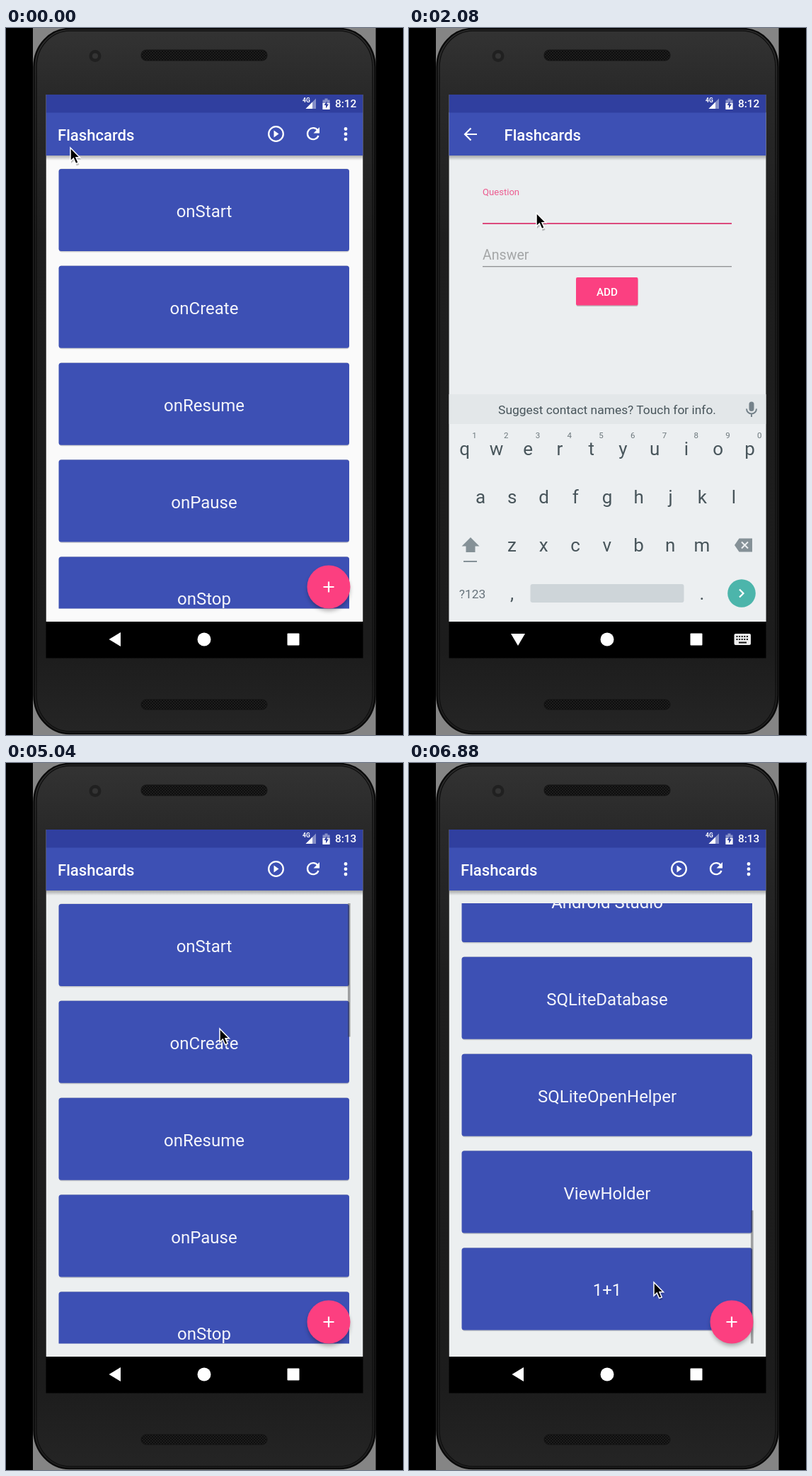
An HTML page for the animation above (6960 ms loop, 561 by 998 pixels).

```html
<!DOCTYPE html>
<html lang="en">
<head>
<meta charset="utf-8">
<title>Flashcards demo</title>
<style>
  html, body { margin: 0; width: 100%; height: 100%; overflow: hidden; background: #000; }
  svg { display: block; width: 561px; height: 998px; font-family: Roboto, "Noto Sans", sans-serif; }
  .mid { text-anchor: middle; }
  .title { font-size: 22.1px; font-weight: 500; fill: #fff; }
  .card { font-size: 24px; fill: #f4f5fb; text-anchor: middle; }
  .field { font-size: 19.6px; fill: #444647; }
  .key { font-size: 26px; fill: #48555b; text-anchor: middle; }
  .digit { font-size: 11.5px; fill: #6c777c; text-anchor: middle; }
</style>
</head>
<body>
<svg viewBox="0 0 561 998">
  <defs>
    <linearGradient id="body" x2="0" y2="1">
      <stop offset="0" stop-color="#333"/><stop offset=".09" stop-color="#292929"/>
      <stop offset=".3" stop-color="#1e1e1e"/><stop offset=".88" stop-color="#1c1c1c"/>
      <stop offset="1" stop-color="#252525"/>
    </linearGradient>
    <linearGradient id="drop" x2="0" y2="1">
      <stop offset="0" stop-opacity=".3"/><stop offset="1" stop-opacity="0"/>
    </linearGradient>
    <pattern id="mesh" width="4" height="4" patternUnits="userSpaceOnUse">
      <rect width="4" height="4" fill="#1d1d1d"/>
      <circle cx="1" cy="1" r="1" fill="#090909"/><circle cx="3" cy="3" r="1" fill="#090909"/>
    </pattern>
    <filter id="blur" x="-30%" y="-30%" width="160%" height="160%"><feGaussianBlur stdDeviation="3"/></filter>
    <clipPath id="screen"><rect x="56.500" y="94" width="448" height="744"/></clipPath>
    <clipPath id="listClip"><rect x="70" y="198" width="417" height="621.500"/></clipPath>
    <g id="bar">
      <rect x="56.500" y="180" width="448" height="7" fill="url(#drop)"/>
      <rect x="56.500" y="119" width="448" height="61" fill="#3d50b4"/>
    </g>
  </defs>

  <rect width="561" height="998"/>
  <rect x="38" width="484.500" height="998" fill="#858585"/>
  <rect x="39.500" y="1" width="482" height="995" rx="50" ry="54" fill="url(#body)" stroke="#0b0b0b" stroke-width="2.500"/>
  <rect x="43" y="4" width="475" height="989" rx="47" ry="51" fill="none" stroke="#111" stroke-width="1.500"/>
  <circle cx="126" cy="39.500" r="8.500" fill="#202020"/><circle cx="126" cy="39.500" r="4" fill="#343434"/>
  <rect x="191" y="31" width="178" height="15" rx="7" fill="url(#mesh)" stroke="#151515"/>
  <rect x="191" y="948" width="178" height="14" rx="7" fill="url(#mesh)" stroke="#131313"/>

  <g clip-path="url(#screen)">
    <rect id="paper" x="56.500" y="94" width="448" height="744"/>
    <g id="list">
      <g clip-path="url(#listClip)">
        <g id="cards"></g>
        <rect id="thumb" x="483" width="3.600" height="188.500" fill="#333" fill-opacity=".42"/>
      </g>
      <use href="#bar"/>
      <text class="title" x="73" y="158.500">Flashcards</text>
      <g fill="none" stroke="#fff" stroke-width="2.300">
        <circle cx="381.500" cy="149.500" r="10.300"/>
        <path d="M440.500 144.500A8 8 0 1 0 441.500 152"/>
      </g>
      <path fill="#fff" d="M378.500 144.500v10l7-5zM443 140v8.500h-8.500z"/>
      <g fill="#fff"><circle cx="480" cy="142.500" r="2.400"/><circle cx="480" cy="149.700" r="2.400"/><circle cx="480" cy="157" r="2.400"/></g>
      <circle cx="456" cy="793" r="29.500" opacity=".32" filter="url(#blur)"/>
      <circle cx="456" cy="789" r="30.500" fill="#fc3f80"/>
      <path d="M448.500 789h15M456 781.500v15" stroke="#fff" stroke-width="2.200"/>
    </g>

    <g id="form">
      <rect x="56.500" y="119" width="448" height="719" fill="#ebeef0"/>
      <use href="#bar"/>
      <path d="M96 150H79.500M87.500 141.500L79 150l8.500 8.500" fill="none" stroke="#fff" stroke-width="2.200"/>
      <text class="title" x="134.500" y="158.500">Flashcards</text>
      <g id="fields"></g>
      <rect x="236.500" y="354" width="87" height="39" rx="2" opacity=".2"/>
      <rect x="236" y="352" width="87.500" height="39.500" rx="2" fill="#fb4081"/>
      <text class="mid" x="280" y="377.500" font-size="15.250" font-weight="500" fill="#fff">ADD</text>
    </g>

    <g id="keyboard">
      <rect x="56.500" y="517" width="448" height="321" fill="#eceff1"/>
      <rect x="56.500" y="517" width="448" height="42" fill="#e3e7e9"/>
      <text class="mid" x="280" y="545" font-size="17.400" fill="#48555b">Suggest contact names? Touch for info.</text>
      <rect x="480.500" y="527.500" width="7" height="13.500" rx="3.500" fill="#75828a"/>
      <path d="M477 537.500a7 7 0 0 0 14 0M484 544.500v4.500" fill="none" stroke="#75828a" stroke-width="2"/>
      <g id="keys"></g>
      <path d="M87 719l12.500 12.500h-6v8.500h-13v-8.500h-6z" fill="#859197"/>
      <rect x="77" y="752" width="19" height="2" fill="#859197"/>
      <path d="M460 730l6.500-9.500H485v19H466.500z" fill="#859197"/>
      <path d="M470 725.500l9 9m0-9l-9 9" stroke="#eceff1" stroke-width="2"/>
      <text class="mid" x="89.500" y="804.500" font-size="17.400" fill="#66727a">?123</text>
      <rect x="171.500" y="785" width="217" height="26" rx="3" fill="#ced5d9"/>
      <circle cx="470" cy="798" r="19.800" fill="#4cb5ab"/>
      <path d="M467 792.500l5.500 5.500-5.500 5.500" fill="none" stroke="#fff" stroke-width="2.200"/>
    </g>

    <rect x="56.500" y="94" width="448" height="25.500" fill="#303f9f"/>
    <text x="419" y="105" font-size="8.500" font-weight="700" fill="#fff">4G</text>
    <path d="M423.500 114H438V99.500z" fill="#8790c8"/><path d="M423.500 114H433V104.500z" fill="#fff"/>
    <path d="M447.500 101.500h3v-2h4v2h3V115h-10z" fill="#8790c8"/><path d="M447.500 106h10v9h-10z" fill="#fff"/>
    <path d="M453.500 103l-4 6h2.500v4.500l4-6h-2.500z" fill="#303f9f"/>
    <text id="clock" x="465" y="112.300" font-size="15.400" font-weight="500" fill="#fff"></text>
  </g>

  <rect x="56.500" y="838" width="448" height="51.500"/>
  <path id="back" fill="#fff"/>
  <circle cx="280" cy="863" r="9.500" fill="#fff"/>
  <rect x="397.500" y="854.500" width="17" height="17" rx="1" fill="#fff"/>
  <g id="imeIcon">
    <rect x="459.500" y="855" width="23.500" height="16" rx="2" fill="#eee"/>
    <path d="M462.500 859h18M462.500 863h18" stroke="#111" stroke-width="2" stroke-dasharray="2 1.600"/>
    <path d="M466 867.500h11" stroke="#111" stroke-width="2"/>
  </g>

  <circle id="ring" r="28" fill="none" stroke="#000" stroke-width="3.500"/>
  <g id="pointer">
    <path d="M0 1V20l4.500-4 3.300 7.500 3.700-1.600-3.200-7.300H14z" transform="translate(1 2)" opacity=".22"/>
    <path d="M0 0V19l4.300-4 3.300 7.600 3.600-1.600-3.200-7.300H13.500z" fill="#000" stroke="#fff" stroke-width="1.500"/>
  </g>
</svg>
<script>
const LOOP = 6960, STEP = 80, PITCH = 136.85, VIEW = 622;
const names = ["onStart", "onCreate", "onResume", "onPause", "onStop", "onDestroy", "Adapter", "ListView",
  "RecyclerView", "AsyncTask", "Android Studio", "SQLiteDatabase", "SQLiteOpenHelper", "ViewHolder", "1+1"];

// [time, x, y]
const pointerPath = [[0, 91, 169], [80, 91, 169], [640, 450, 786], [800, 450, 786], [1120, 421, 535],
  [1520, 180, 261], [2960, 180, 261], [3200, 175, 308], [3600, 175, 308], [4160, 278, 371],
  [4480, 278, 371], [5040, 302, 375], [5280, 345, 640], [5680, 351, 436], [5760, 351, 436],
  [6040, 352, 680], [6240, 353, 470], [6320, 353, 452], [6720, 346, 733], [LOOP, 346, 733]];
// [time, offset]
const scrollPath = [[0, 0], [5280, 0], [5440, 70], [5600, 200], [5680, 335], [5760, 474], [5840, 575],
  [6000, 710], [6080, 760], [6240, 960], [6320, 1056], [6400, 1145], [6560, 1290], [6720, 1390], [6880, 1430.5], [LOOP, 1430.5]];
// [from, to]
const presses = [[640, 800], [1520, 1680], [3200, 3360], [4240, 4400], [5280, 5600], [6080, 6240]];

const $ = id => document.getElementById(id);
const set = (el, attrs) => { for (const k in attrs) el.setAttribute(k, attrs[k]); };
const ramp = (t, a, b) => Math.min(1, Math.max(0, (t - a) / (b - a)));
const smooth = p => p * p * (3 - 2 * p);
const mix = (a, b, p) => a + (b - a) * p;

function along(path, t, ease = p => p) {
  let i = 1;
  while (i < path.length - 1 && path[i][0] < t) i++;
  const a = path[i - 1], b = path[i], p = ease(ramp(t, a[0], b[0]));
  return a.slice(1).map((v, k) => mix(v, b[k + 1], p));
}

$("cards").innerHTML = names.map((name, i) => {
  const y = 199 + i * PITCH;
  return `<rect x="75" y="${y - 0.5}" width="410" height="118" rx="4" opacity=".16"/>
    <rect x="74.500" y="${y}" width="410.500" height="116" rx="3.500" fill="#3d50b4"/>
    <text class="card" x="280" y="${y + 68}">${name}</text>`;
}).join("");

const keyRow = (row, x0, y) => [...row].map((c, i) =>
  `<text class="key" x="${x0 + i * 44.75}" y="${y}">${c}</text>`).join("");
$("keys").innerHTML = keyRow("qwertyuiop", 78.7, 603) + keyRow("asdfghjkl", 101, 671) +
  keyRow("zxcvbnm", 145.5, 739) + keyRow(",", 145.5, 807) + keyRow(".", 414, 807) +
  [..."1234567890"].map((c, i) => `<text class="digit" x="${92.5 + i * 44.75}" y="578.500">${c}</text>`).join("");

$("fields").innerHTML = ["Question", "Answer"].map((label, i) =>
  `<text id="hint${i}" x="104">${label}</text><text class="field" id="value${i}" x="104" y="${267 + i * 60.5}"></text>
   <rect id="line${i}" x="104" width="352"/>`).join("") +
  `<rect id="caret" width="1.800" height="25" fill="#e0447c"/>`;

function drawField(i, lift, active, lineOn, value) {
  const top = i * 60.5;
  set($("hint" + i), { y: top + mix(266.2, 236, lift), "font-size": mix(19.6, 13.1, lift),
    fill: active && lift > 0 ? "#ec5c90" : "#a4a6a7" });
  set($("line" + i), { y: (lineOn ? 275 : 275.7) + top, height: lineOn ? 2 : 1.1, fill: lineOn ? "#dc4a7d" : "#7d7f80" });
  $("value" + i).textContent = value;
}

function draw(t) {
  const enter = smooth(ramp(t, 800, 1040)), leave = smooth(ramp(t, 4480, 4720));
  set($("form"), { opacity: enter * (1 - leave), transform: `translate(0 ${60 * (1 - enter + leave)})` });
  set($("paper"), { fill: t < 1040 ? "#fafafa" : "#eceff0" });

  const second = t >= 3280;
  const question = t < 2240 ? "" : t < 2480 ? "1" : t < 2720 ? "1+" : "1+1";
  const answer = t < 3760 ? "" : "2";
  drawField(0, smooth(ramp(t, 1120, 1360)), t < 3360, t < 3360, question);
  drawField(1, smooth(ramp(t, 3280, 3520)), second, second, answer);
  const typed = second ? answer : question;
  const blink = t >= 1120 && t !== 3280 && (t - 1120) % 1000 < 500;
  set($("caret"), { x: 104 + (typed ? $(second ? "value1" : "value0").getComputedTextLength() + 1 : 0),
    y: 247 + (second ? 60.5 : 0), visibility: blink ? "visible" : "hidden" });

  const up = smooth(ramp(t, 1680, 1920)) * (1 - smooth(ramp(t, 4400, 4640)));
  set($("keyboard"), { transform: `translate(0 ${321 * (1 - up)})`, visibility: up ? "visible" : "hidden" });
  const ime = up > 0.4;
  set($("back"), { d: ime ? "M144 855h20l-10 17z" : "M145.500 863l16.500-10v20z" });
  set($("imeIcon"), { visibility: ime ? "visible" : "hidden" });
  $("clock").textContent = t < 4000 ? "8:12" : "8:13";

  const [offset] = along(scrollPath, t);
  set($("cards"), { transform: `translate(0 ${-offset})` });
  set($("thumb"), { y: 198 + offset * VIEW / (PITCH * names.length), visibility: t >= 4480 ? "visible" : "hidden" });

  const [x, y] = along(pointerPath, t, smooth);
  set($("pointer"), { transform: `translate(${x} ${y})` });
  set($("ring"), { cx: x + 0.5, cy: y + 1.5,
    visibility: presses.some(([a, b]) => t >= a && t < b) ? "visible" : "hidden" });
}

function tick() {
  draw(Math.floor(performance.now() % LOOP / STEP) * STEP);
  requestAnimationFrame(tick);
}
tick();
</script>
</body>
</html>
```
